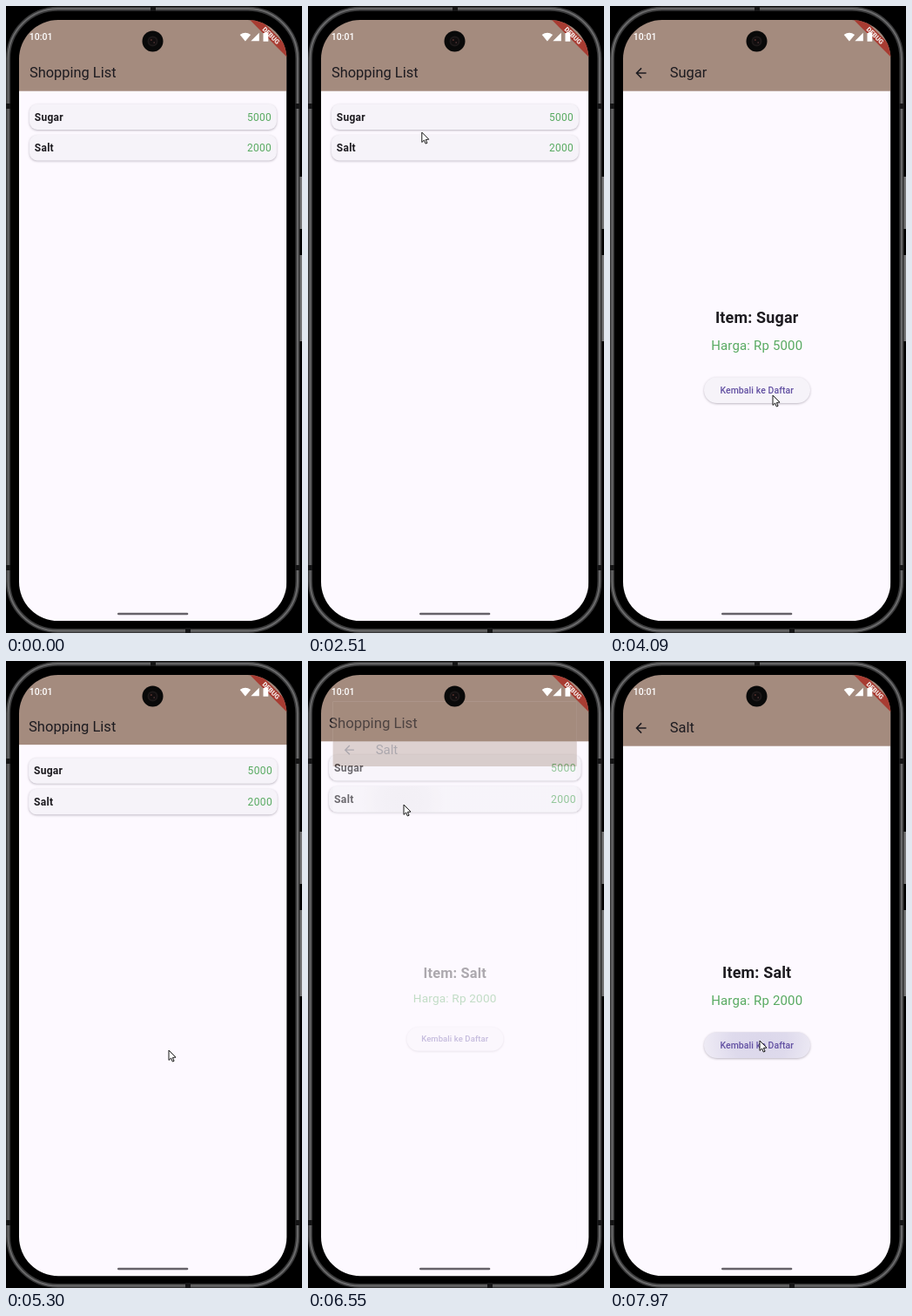
Write an HTML page with a canvas that moves like this. It is 340 px wide and 720 px high and loops after 8 s.

```html
<!DOCTYPE html>
<html lang="id">
<head>
<meta charset="utf-8">
<title>Shopping List</title>
<style>
html, body { margin: 0; width: 100%; height: 100%; overflow: hidden; background: #000; }
canvas { display: block; width: 340px; height: 720px; }
</style>
</head>
<body>
<canvas id="stage" width="340" height="720"></canvas>
<script>
const W = 340, H = 720, LOOP = 8000;
const ctx = document.getElementById('stage').getContext('2d');
const layer = document.createElement('canvas');
layer.width = W;
layer.height = H;
const page = layer.getContext('2d');

const SCREEN = { x: 15, y: 16, w: 307.4, h: 690.2 };
const CX = SCREEN.x + SCREEN.w / 2, CY = SCREEN.y + SCREEN.h / 2;
const BROWN = '#a48b7e', SURFACE = '#fdf9ff', RAISED = '#f6f3f9';
const INK = '#1d1b20', GREEN = '#58aa61', PURPLE = '#6250a2';
const ITEMS = [
  { name: 'Sugar', price: 5000, y: 112.6 },
  { name: 'Salt', price: 2000, y: 148 }
];

// Taps start a ripple; a page change follows shortly after.
const TAPS = [
  { at: 3100, go: 3186, x: 135, y: 133, item: 0, open: true },
  { at: 5000, go: 5148, x: 187, y: 447, item: 0, open: false },
  { at: 6450, go: 6500, x: 110, y: 165, item: 1, open: true },
  { at: 7810, go: 9000, x: 172, y: 436, item: 1, open: false }
];
const ZOOM_MS = 300;

// time, x, y of the pointer tip
const POINTER = [
  [1880, 13, 484], [2590, 135, 133], [3280, 135, 133], [3890, 169, 424],
  [4090, 187, 447], [5310, 187, 447], [5740, 117, 172], [5840, 117, 172],
  [5930, 112, 142], [6050, 110, 165], [6570, 110, 165], [7180, 172, 436]
];

const clamp = v => Math.max(0, Math.min(1, v));
const mix = (a, b, k) => a + (b - a) * k;
const ramp = (v, a, b) => clamp((v - a) / (b - a));

function bezier(x1, y1, x2, y2) {
  const at = (a, b, s) => 3 * a * s * (1 - s) ** 2 + 3 * b * s * s * (1 - s) + s ** 3;
  return x => {
    let lo = 0, hi = 1;
    for (let i = 0; i < 22; i++) {
      const mid = (lo + hi) / 2;
      if (at(x1, x2, mid) < x) lo = mid; else hi = mid;
    }
    return at(y1, y2, lo);
  };
}
const zoomStart = bezier(0.05, 0, 0.1333, 0.06);
const zoomEnd = bezier(0.2083, 0.82, 0.25, 1);
const zoomCurve = p => p < 1 / 6
  ? 0.4 * zoomStart(p * 6)
  : 0.4 + 0.6 * zoomEnd(clamp((p - 1 / 6) * 1.2));

function text(c, str, x, y, size, { weight = 400, color = INK, align = 'left', spacing = 0 } = {}) {
  c.font = `${weight} ${size}px Roboto, sans-serif`;
  c.letterSpacing = spacing + 'px';
  c.textAlign = align;
  c.fillStyle = color;
  c.fillText(str, x, y);
}

function shape(c, x, y, w, h, r) {
  c.beginPath();
  c.roundRect(x, y, w, h, r);
}

function raised(c, x, y, w, h, r, tap, t) {
  c.save();
  c.shadowColor = 'rgba(40,30,50,.3)';
  c.shadowBlur = 2.5;
  c.shadowOffsetY = 0.9;
  shape(c, x, y, w, h, r);
  c.fillStyle = RAISED;
  c.fill();
  c.restore();
  if (tap) ripple(c, tap, t);
}

function ripple(c, tap, t) {
  const age = t - tap.at;
  c.save();
  c.clip();
  const radius = mix(12, 90, ramp(age, 0, 220));
  const glow = c.createRadialGradient(tap.x, tap.y, 0, tap.x, tap.y, radius);
  const rgb = tap.open ? '29,27,32' : '90,80,165';
  const strength = (tap.open ? 0.04 : 0.17) * ramp(age, -20, 70);
  glow.addColorStop(0, `rgba(${rgb},${strength})`);
  glow.addColorStop(0.45, `rgba(${rgb},${strength * 0.9})`);
  glow.addColorStop(1, `rgba(${rgb},${strength * 0.2})`);
  c.fillStyle = glow;
  c.fillRect(0, 0, W, H);
  c.restore();
}

function pageBase(c) {
  c.fillStyle = SURFACE;
  c.fillRect(SCREEN.x, SCREEN.y, SCREEN.w, SCREEN.h);
  c.fillStyle = BROWN;
  c.fillRect(SCREEN.x, SCREEN.y, SCREEN.w, 81.7);
}

function listPage(c, tap, t) {
  pageBase(c);
  text(c, 'Shopping List', 26.9, 82.4, 16.43);
  ITEMS.forEach((item, i) => {
    const pressed = tap && tap.open && tap.item === i;
    raised(c, 26.9, item.y, 284, 29.4, 9, pressed && tap, t);
    const base = item.y + 18.9;
    text(c, item.name, 32.8, base, 11.95, { weight: 700, spacing: 0.3 });
    text(c, String(item.price), 305.2, base, 11.95, { color: GREEN, align: 'right', spacing: 0.37 });
  });
}

function detailPage(c, item, tap, t) {
  pageBase(c);
  c.strokeStyle = INK;
  c.lineWidth = 1.5;
  c.beginPath();
  c.moveTo(41.6, 77);
  c.lineTo(30.6, 77);
  c.moveTo(36.1, 71.4);
  c.lineTo(30.5, 77);
  c.lineTo(36.1, 82.6);
  c.stroke();
  text(c, item.name, 68.8, 82.4, 16.43);
  const mid = { align: 'center', spacing: 0.187 };
  text(c, 'Item: ' + item.name, CX, 364.4, 17.93, { ...mid, weight: 700 });
  text(c, 'Harga: Rp ' + item.price, CX, 394.7, 14.94, { ...mid, color: GREEN });
  raised(c, 108, 426.2, 122, 29.9, 15, tap && !tap.open && tap, t);
  text(c, 'Kembali ke Daftar', CX, 444.7, 10.46, { weight: 500, color: PURPLE, align: 'center', spacing: 0.075 });
}

function showPage(draw, scale = 1, alpha = 1) {
  if (alpha <= 0) return;
  page.setTransform(1, 0, 0, 1, 0, 0);
  page.clearRect(0, 0, W, H);
  page.setTransform(scale, 0, 0, scale, CX * (1 - scale), CY * (1 - scale));
  draw(page);
  ctx.globalAlpha = alpha;
  ctx.drawImage(layer, 0, 0);
  ctx.globalAlpha = 1;
}

function scrim(alpha) {
  ctx.globalAlpha = alpha;
  ctx.fillStyle = SURFACE;
  ctx.fillRect(0, 0, W, H);
  ctx.globalAlpha = 1;
}

function pages(t) {
  const tap = TAPS.filter(k => t >= k.at).pop();
  const list = c => listPage(c, tap && t < tap.go + ZOOM_MS ? tap : null, t);
  if (!tap) return showPage(list);
  const detail = c => detailPage(c, ITEMS[tap.item], tap, t);
  const p = (t - tap.go) / ZOOM_MS;
  if (p < 0) return showPage(tap.open ? list : detail);
  if (p >= 1) return showPage(tap.open ? detail : list);
  const k = zoomCurve(p);
  if (tap.open) {
    showPage(list, mix(1, 1.05, k));
    scrim(0.6 * ramp(p, 0.2075, 0.4175));
    showPage(detail, mix(0.85, 1, k), ramp(p, 0.125, 0.25));
  } else {
    showPage(list, mix(1.1, 1, k));
    showPage(detail, mix(1, 0.9, k), 1 - ramp(p, 0.0825, 0.2075));
  }
}

function polygon(points, color) {
  ctx.beginPath();
  points.forEach(([x, y]) => ctx.lineTo(x, y));
  ctx.closePath();
  ctx.fillStyle = color;
  ctx.fill();
}

function debugBanner() {
  ctx.save();
  ctx.translate(SCREEN.x + SCREEN.w, SCREEN.y);
  ctx.rotate(Math.PI / 4);
  ctx.fillStyle = '#a83c32';
  ctx.fillRect(-32, 20.9, 64, 9);
  text(ctx, 'DEBUG', 0, 28.1, 7.6, { weight: 900, color: '#f4eae8', align: 'center' });
  ctx.restore();
}

function statusBar() {
  text(ctx, '10:01', 26.8, 39.2, 10.46, { weight: 500, color: '#fff' });
  ctx.beginPath();
  ctx.moveTo(274.9, 40.4);
  ctx.lineTo(268.7, 33);
  ctx.quadraticCurveTo(274.9, 28.6, 281.1, 33);
  ctx.fillStyle = '#fff';
  ctx.fill();
  polygon([[290.8, 30.8], [290.8, 40.3], [281.3, 40.3]], '#fff');
  ctx.fillRect(295.5, 31, 5.8, 9.7);
  ctx.fillRect(297, 29.9, 2.8, 1.2);
}

function disc(x, y, r, color) {
  ctx.beginPath();
  ctx.arc(x, y, r, 0, Math.PI * 2);
  ctx.fillStyle = color;
  ctx.fill();
}

function camera() {
  disc(168.5, 40.5, 12, '#090909');
  disc(168.5, 40.5, 6, '#1d1919');
  disc(168.5, 40.5, 4, '#100d0e');
  disc(166.8, 39, 1, '#54302c');
  disc(170.2, 42, 0.9, '#453030');
}

function phone() {
  ctx.fillStyle = '#000';
  ctx.fillRect(0, 0, W, H);
  shape(ctx, 2.5, 3.2, 332.4, 714.3, 57);
  ctx.lineWidth = 5;
  ctx.strokeStyle = '#3a3a3b';
  ctx.stroke();
  ctx.lineWidth = 1.8;
  ctx.strokeStyle = '#6c6c6d';
  ctx.stroke();
  ctx.fillStyle = '#747475';
  ctx.fillRect(337.5, 196, 2.5, 60);
  ctx.fillRect(337.5, 286, 2.5, 99);
  ctx.fillStyle = '#151516';
  for (const y of [112, 642]) {
    ctx.fillRect(0, y, 5, 6);
    ctx.fillRect(332.4, y, 5, 6);
  }
  ctx.fillRect(166, 0, 6, 6);
  ctx.fillRect(206, 714, 6, 6);
}

function pointer(t) {
  if (t < POINTER[0][0]) return;
  let i = POINTER.length - 1;
  while (POINTER[i][0] > t) i--;
  const a = POINTER[i], b = POINTER[i + 1] || a;
  const s = a === b ? 0 : ramp(t, a[0], b[0]);
  const k = s * s * (3 - 2 * s);
  const x = mix(a[1], b[1], k), y = mix(a[2], b[2], k);
  ctx.save();
  ctx.translate(x, y);
  if (x < SCREEN.x + 1) {
    ctx.fillStyle = '#e4e4e4';
    ctx.fillRect(-2, -5.5, 4.5, 1);
    ctx.fillRect(-0.3, -5, 1.1, 10);
    ctx.fillRect(-2, 4.8, 4.5, 1);
  } else {
    polygon([[0, 0], [0, 11.4], [2.6, 9], [4.3, 13], [6.1, 12.2], [4.4, 8.4], [8, 8.1]], '#fff');
    ctx.lineWidth = 1;
    ctx.strokeStyle = '#161616';
    ctx.stroke();
  }
  ctx.restore();
}

function render(t) {
  phone();
  ctx.save();
  shape(ctx, SCREEN.x, SCREEN.y, SCREEN.w, SCREEN.h, 45);
  ctx.clip();
  pages(t);
  debugBanner();
  statusBar();
  shape(ctx, 128, 696.7, 81.3, 2.6, 1.3);
  ctx.fillStyle = '#666269';
  ctx.fill();
  ctx.restore();
  camera();
  pointer(t);
}

const start = performance.now();
function tick() {
  render((performance.now() - start) % LOOP);
  requestAnimationFrame(tick);
}
tick();
</script>
</body>
</html>
```
